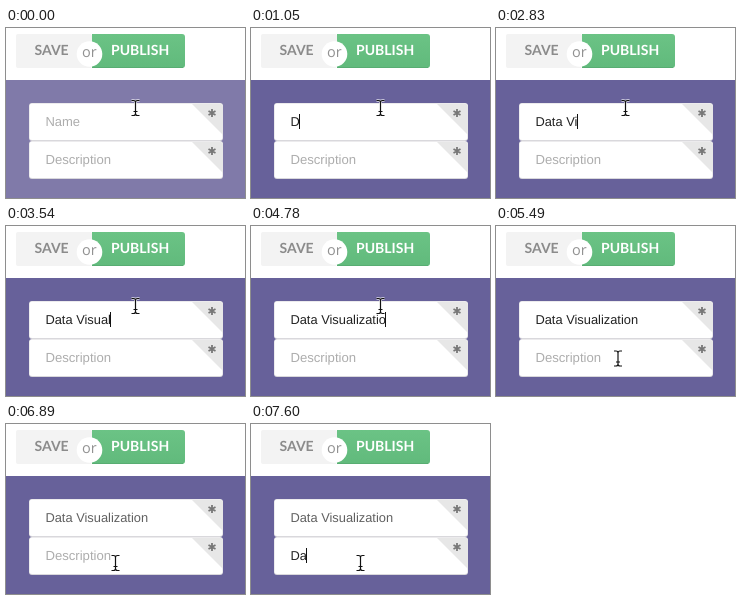
An HTML page that plays this animation: 239x170 px, repeating every 8000 ms.

```html
<!DOCTYPE html>
<html lang="en">
<head>
<meta charset="utf-8">
<title>Form typing</title>
<style>
html, body { margin: 0; width: 100%; height: 100%; overflow: hidden; background: #fff; }
svg { display: block; width: 239px; height: 170px; }
text { white-space: pre; text-rendering: geometricPrecision; }
.btn { font: 700 14px Lato, sans-serif; }
.or { font: 14.5px "Open Sans", sans-serif; fill: #929292; }
.field { font: 12.87px "Liberation Sans", Arial, sans-serif; }
</style>
</head>
<body>
<svg viewBox="0 0 239 170" xmlns="http://www.w3.org/2000/svg">
  <defs>
    <linearGradient id="green" x2="0" y2="1">
      <stop stop-color="#6bc385"/><stop offset="1" stop-color="#61ba7c"/>
    </linearGradient>
    <g id="box">
      <rect x="23" y="75" width="194" height="38" rx="3" fill="#d9d8dc"/>
      <rect x="23.5" y="75.5" width="193" height="36.5" rx="2.5" fill="#fff"/>
      <path d="M186 76H214.5Q217 76 217 78.5V107Z" fill="#e7e7e7"/>
      <path d="M206 81V89M202.5 83L209.5 87M202.5 87L209.5 83" stroke="#777" stroke-width="1.8"/>
    </g>
  </defs>
  <rect width="239" height="170" fill="#fff"/>
  <rect id="panel" y="52" width="239" height="118"/>
  <rect x="10" y="6" width="76" height="34" rx="2" fill="#f3f3f3"/>
  <path d="M86 6H176Q179 6 179 9V37Q179 40 176 40H86Z" fill="url(#green)"/>
  <path d="M86 39.5H177" stroke="#58ad72"/>
  <circle cx="83.5" cy="26" r="12.8" fill="#fff"/>
  <text class="btn" x="28.5" y="27" fill="#8b8b8b">SAVE</text>
  <text class="btn" x="105" y="27" fill="#fff">PUBLISH</text>
  <text class="or" x="76" y="29">or</text>
  <use href="#box"/>
  <use href="#box" y="38"/>
  <text id="name" class="field" x="39.4" y="98"></text>
  <text id="desc" class="field" x="39.4" y="136"></text>
  <rect id="caret" width="1" height="15" fill="#111"/>
  <g id="beam" fill="none">
    <path d="M-4 -7.5H-2Q0 -7.5 0 -5.5Q0 -7.5 2 -7.5H4M0 -6V6M-4 7.5H-2Q0 7.5 0 5.5Q0 7.5 2 7.5H4M-2 3.5H2" stroke="#fff" stroke-width="2.6" opacity=".8"/>
    <path d="M-4 -7.5H-2Q0 -7.5 0 -5.5Q0 -7.5 2 -7.5H4M0 -6V6M-4 7.5H-2Q0 7.5 0 5.5Q0 7.5 2 7.5H4M-2 3.5H2" stroke="#111" stroke-width="1.2"/>
  </g>
</svg>
<script>
const LOOP = 8000, FOCUS = 6060;
const WORDS = 'Data Visualization';
const $ = id => document.getElementById(id);
const nameKeys = [1050, 1290, 1580, 1640, 1750, 2470, 2830, 3130, 3310, 3430,
  3540, 3780, 4200, 4260, 4550, 4730, 4780, 4960];
const descKeys = [7430, 7600];
const caretOff = [[0, 180], [630, 1050], [2290, 2470], [5430, FOCUS], [6890, 7430]];
// time, x, y
const path = [[5250, 129.5, 80], [5600, 119.5, 151], [5830, 112.5, 143], [6060, 109.5, 139]];

const ctx = document.createElement('canvas').getContext('2d');
ctx.font = '12.87px "Liberation Sans", Arial, sans-serif';

const typed = (keys, t) => WORDS.slice(0, keys.filter(k => k <= t).length);

function setField(el, value, hint, size, color) {
  el.textContent = value || hint;
  el.style.fontSize = (value ? 12.87 : size) + 'px';
  el.setAttribute('fill', value ? color : '#adadad');
}

function pointer(t) {
  if (t < 5310) return path[0].slice(1);
  if (t >= FOCUS) return path[3].slice(1);
  const s = 5310 + Math.floor((t - 5310) / 57.7) * 57.7;
  const i = s < path[1][0] ? 0 : s < path[2][0] - 5 ? 1 : 2;
  const [a, b] = [path[i], path[i + 1]];
  const p = Math.max(0, (s - a[0]) / (b[0] - a[0]));
  const e = p * p * (3 - 2 * p);
  return [1, 2].map(k => Math.round((a[k] + (b[k] - a[k]) * e) * 2) / 2);
}

function draw(t) {
  const second = t >= FOCUS;
  const title = typed(nameKeys, t), about = typed(descKeys, t);
  $('panel').setAttribute('fill', t < 180 ? '#807aa9' : '#67619a');
  setField($('name'), title, 'Name', 13, second ? '#606060' : '#222');
  setField($('desc'), about, 'Description', 13.15, '#222');

  const caret = $('caret');
  caret.setAttribute('x', Math.floor(39.4 + ctx.measureText(second ? about : title).width));
  caret.setAttribute('y', second ? 124 : 86);
  caret.style.display = caretOff.some(([a, b]) => t >= a && t < b) ? 'none' : '';
  $('beam').setAttribute('transform', `translate(${pointer(t)})`);
}

const start = performance.now();
function tick() {
  draw((performance.now() - start) % LOOP);
  requestAnimationFrame(tick);
}
draw(0);
requestAnimationFrame(tick);
</script>
</body>
</html>
```
